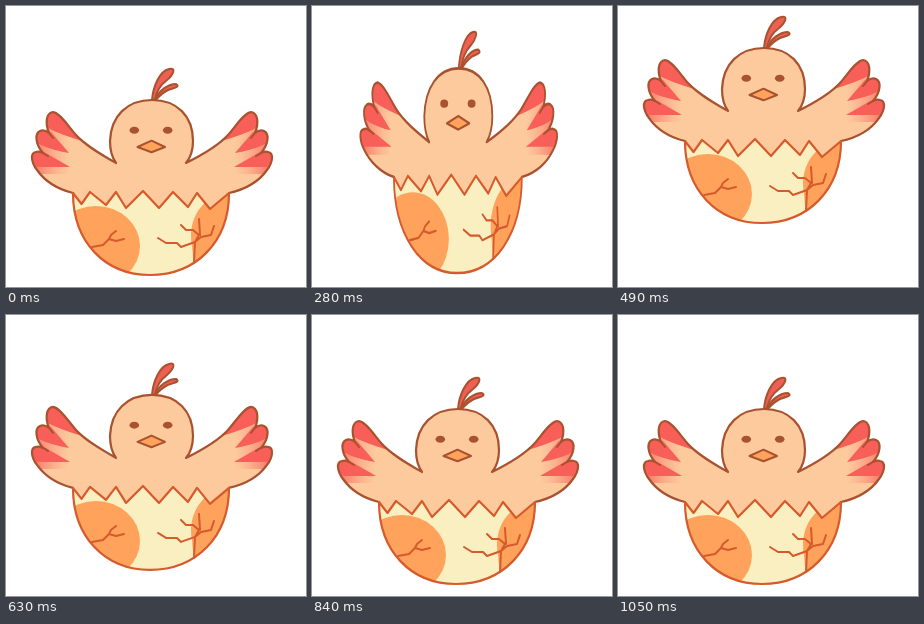
Animation, 300 px wide and 281 px high, one loop 1120 ms. Source, as an HTML page with a canvas:

```html
<!DOCTYPE html>
<html lang="en">
<head>
<meta charset="utf-8">
<title>Hopping chick</title>
<style>
  html, body { margin: 0; width: 100%; height: 100%; overflow: hidden; background: #fff; }
  canvas { display: block; width: 300px; height: 281px; }
</style>
</head>
<body>
<canvas id="stage" width="300" height="281"></canvas>
<script>
const ctx = document.getElementById('stage').getContext('2d');
const STEP = 70, STEPS = 16;
const SKIN = '#fdca9e', BROWN = '#a8522f', RUST = '#d65a2b';
const CREAM = '#f9efc0', ORANGE = '#ffa35c', RED = '#f75f58';

const BODY = new Path2D(`M67 187 C51 183 38 174 31 164 C25 156 24 147 30 146
  Q33 145 37 147 C30 139 28 128 34 125 Q38 123 43 127
  C39 117 40 107 47 106 C54 107 62 120 70 129 C80 140 96 149 110 157
  C105 150 104 143 104 135 C105 110 121 94 146 94
  C171 94 187 110 187 135 C187 144 185 151 180 157
  C196 149 212 140 222 129 C230 120 238 107 245 106 C252 107 253 117 249 127
  Q254 123 258 125 C264 128 262 139 255 147 Q259 145 262 146
  C268 147 267 156 261 164 C254 174 241 183 223 187`);
const FEATHERS = ['M44 103 L39 120 Q47 126 76 135 L60 112 Z',
                  'M33 122 L28 134 Q35 142 63 147 L45 126 Z',
                  'M28 143 L22 150 L31 161 L64 161 L38 146 Z'].map(d => new Path2D(d));
const NOTCHES = new Path2D('M43 127 L47 132 M37 147 L42 150');
const TOOTH = [67,187, 75.5,198, 84,186, 100,199, 110,186, 120,202, 137,185,
               153,202, 167,186, 182,201, 191,187, 204,203, 223,187];
const BOWL = ' C223 236 190 269 144 269 C99 269 67 236 67 187 Z';
const SHELL = new Path2D('M' + TOOTH.join(' ') + BOWL);
const BELLY = new Path2D('M67 187 L223 187' + BOWL);
const SPOT = new Path2D('M218 187 C190 194 182 220 186 240 L189 272 L240 272 L240 187 Z');
const CRACKS = new Path2D(`M86 241 L97 239 L103 233 L105 229 L110 225
  M103 233 L110 235 L118 233
  M152 232 L160 237 L171 237 L175 241 L189 236 L195 231 L205 229 L208 220
  M175 219 L180 224 L187 224 L193 229 L189 236 L188 257 M193 213 L194 229`);
const COMB = ['M146 94 C147 80 154 65 163 63 C171 61 167 69 161 74 C153 80 150 87 149 94 Z',
              'M149 93 C154 84 162 78 170 78 C175 81 167 82 162 84 C156 87 153 90 150 94 Z'
             ].map(d => new Path2D(d));
const BEAK = new Path2D('M131.5 141 L145.5 134.7 L159 141 L145.5 146.3 Z');

// width, height and lift for crouch, take-off, landing and settling
const POSES = {
  1: [1.07, .93, 0], 2: [1.1375, .855, 0], 3: [.98, 1.01, 0], 4: [.82, 1.169, 0],
  5: [.92, 1.07, 38], 10: [1.06, .91, 0], 11: [1.125, .82, 0],
  13: [.97, 1.035, 0], 14: [.985, 1.018, 0]
};

function pose(i) {
  if (i >= 6 && i <= 9) return [1, 1, 59.5 - 4 * (i - 5.63) ** 2];
  return POSES[i] || [1, 1, 0];
}

function shape(path, fill, line, width) {
  if (fill) { ctx.fillStyle = fill; ctx.fill(path); }
  if (line) { ctx.strokeStyle = line; ctx.lineWidth = width; ctx.stroke(path); }
}

function oval(x, y, rx, ry, fill) {
  ctx.beginPath();
  ctx.ellipse(x, y, rx, ry, 0, 0, Math.PI * 2);
  ctx.fillStyle = fill;
  ctx.fill();
}

function wingTips() {
  const glow = ctx.createLinearGradient(28, 0, 64, 0);
  glow.addColorStop(0, 'rgba(247,95,88,.8)');
  glow.addColorStop(1, 'rgba(247,150,120,0)');
  ctx.fillStyle = glow;
  ctx.fillRect(0, 100, 80, 68);
  FEATHERS.forEach(f => shape(f, RED));
  shape(NOTCHES, null, BROWN, 2);
}

function chick() {
  COMB.forEach(c => shape(c, '#ee6054', BROWN, 2));
  shape(BODY, SKIN);
  shape(BELLY, SKIN);
  ctx.save();
  ctx.clip(BODY);
  wingTips();
  ctx.translate(292, 0);
  ctx.scale(-1, 1);
  wingTips();
  ctx.restore();
  shape(BODY, null, BROWN, 2.2);
  oval(128.3, 124.2, 4.8, 3.5, BROWN);
  oval(161.7, 124.2, 4.8, 3.5, BROWN);
  shape(BEAK, ORANGE, BROWN, 2);
}

function egg() {
  shape(SHELL, CREAM);
  ctx.save();
  ctx.clip(SHELL);
  oval(90, 240, 44, 40, ORANGE);
  shape(SPOT, ORANGE);
  ctx.restore();
  shape(CRACKS, null, RUST, 2);
  shape(SHELL, null, RUST, 2.2);
}

function draw(now) {
  const [sx, sy, lift] = pose(Math.floor(now / STEP) % STEPS);
  ctx.setTransform(1, 0, 0, 1, 0, 0);
  ctx.fillStyle = '#fff';
  ctx.fillRect(0, 0, 300, 281);
  ctx.lineJoin = ctx.lineCap = 'round';
  ctx.translate(150, 281 - lift);
  ctx.scale(sx, sy);
  ctx.translate(-150, -281);
  chick();
  egg();
}

const start = performance.now();
function tick() {
  draw(performance.now() - start);
  requestAnimationFrame(tick);
}
tick();
</script>
</body>
</html>
```
